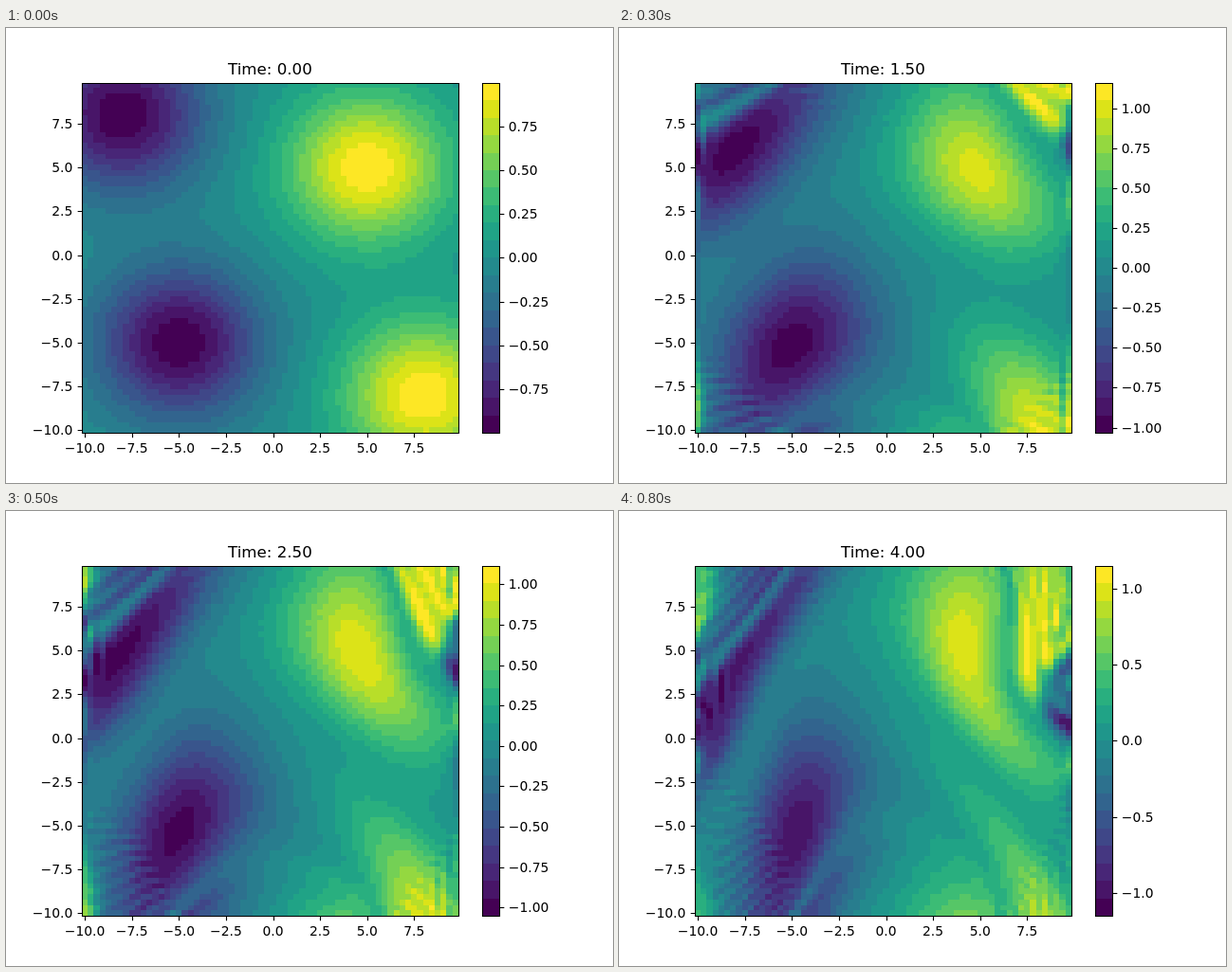
Write an HTML page with a canvas that moves like this. It is 640 px wide and 480 px high and loops after 0.9 s.

```html
<!DOCTYPE html>
<html lang="en">
<head>
<meta charset="utf-8">
<title>Vorticity</title>
<style>
  html, body { margin: 0; width: 100%; height: 100%; overflow: hidden; background: #fff; }
  .layer, .layer > * { position: absolute; left: 0; top: 0; width: 640px; height: 480px; }
  svg { font: 13.89px 'DejaVu Sans', sans-serif; }
  .title { font-size: 16.67px; }
  path { fill: none; stroke: #000; stroke-width: 1.11px; }
</style>
</head>
<body>
<script>
const N = 64, SIZE = 20, H = SIZE / N, VISCOSITY = 0.001;
const FRAMES = 9, FRAME_MS = 100, FRAME_DT = 0.5, SUBSTEPS = 8;
const COLORS = ('440154 481568 482677 453781 3f4788 39558c 32648e 2d718e 287d8e 238a8d ' +
  '1f968b 20a386 29af7f 3cbc75 56c667 74d055 94d840 b8de29 dce318 fde725').split(' ').map(c => '#' + c);
const PLOT = { left: 80, right: 476.8, top: 57.6, bottom: 427.2 };
const BAR = { left: 501.6, right: 520.08, top: 57.6, bottom: 427.2 };

// Periodic 2D vorticity equation: spectral Poisson solve, centred differences, RK4.
const field = fn => Float64Array.from({ length: N * N }, (_, n) => fn(n % N, Math.floor(n / N)));
const cas = field((i, k) => {
  const angle = 2 * Math.PI * ((i * k) % N) / N;
  return Math.cos(angle) + Math.sin(angle);
});
const inverseLaplacian = field((i, j) => {
  const kx = Math.min(i, N - i), ky = Math.min(j, N - j);
  return i + j ? -((SIZE / (2 * Math.PI)) ** 2) / (kx * kx + ky * ky) / (N * N) : 0;
});

function transformRows(a) {
  const out = new Float64Array(N * N);
  for (let i = 0; i < N; i++) {
    for (let j = 0; j < N; j++) {
      let sum = 0;
      for (let k = 0; k < N; k++) sum += a[j * N + k] * cas[i * N + k];
      out[i * N + j] = sum;
    }
  }
  return out;
}
const hartley = a => transformRows(transformRows(a));
const streamFunction = w => hartley(hartley(w).map((v, n) => v * inverseLaplacian[n]));

function rate(w) {
  const psi = streamFunction(w), out = new Float64Array(N * N);
  for (let j = 0; j < N; j++) {
    const row = j * N, up = ((j + 1) % N) * N, down = ((j + N - 1) % N) * N;
    for (let i = 0; i < N; i++) {
      const e = row + (i + 1) % N, o = row + (i + N - 1) % N, n = up + i, s = down + i;
      const swirl = (psi[e] - psi[o]) * (w[n] - w[s]) - (psi[n] - psi[s]) * (w[e] - w[o]);
      const spread = w[e] + w[o] + w[n] + w[s] - 4 * w[row + i];
      out[row + i] = (swirl / 4 + VISCOSITY * spread) / (H * H);
    }
  }
  return out;
}

function step(w, dt) {
  const shifted = (k, f) => w.map((v, n) => v + f * k[n]);
  const a = rate(w);
  const b = rate(shifted(a, dt / 2));
  const c = rate(shifted(b, dt / 2));
  const d = rate(shifted(c, dt));
  return w.map((v, n) => v + dt / 6 * (a[n] + 2 * b[n] + 2 * c[n] + d[n]));
}

const BLOBS = [[5, 5, 1], [8, -8, 1], [-5, -5, -1], [-8, 8, -1]];
const initialField = () => field((i, j) => {
  const x = i * H - SIZE / 2, y = j * H - SIZE / 2;
  return BLOBS.reduce((sum, [cx, cy, sign]) =>
    sum + sign * Math.exp(-((x - cx) ** 2 + (y - cy) ** 2) / 18), 0);
});

// Drawing
const lerp = (a, b, t) => a + (b - a) * t;
const snap = p => Math.round(p) + 0.5;
const label = (v, digits) => v.toFixed(digits).replace('-', '\u2212');
const text = (x, y, anchor, content, cls = '') =>
  `<text x="${x}" y="${y}" text-anchor="${anchor}" class="${cls}">${content}</text>`;
const box = b =>
  `<path d="M${snap(b.left)} ${snap(b.top)}H${snap(b.right)}V${snap(b.bottom)}H${snap(b.left)}Z"/>`;

function fillCell(ctx, color, x0, y0, x1, y1) {
  const [l, t, r, b] = [x0, y0, x1, y1].map(Math.round);
  ctx.fillStyle = color;
  ctx.fillRect(l, t, r - l, b - t);
}

function plotAxes() {
  let out = box(PLOT) + box(BAR);
  for (let v = -10; v < 9; v += 2.5) {
    const t = (v + SIZE / 2 + H / 2) / SIZE;
    const x = lerp(PLOT.left, PLOT.right, t), y = lerp(PLOT.bottom, PLOT.top, t);
    out += `<path d="M${snap(x)} 427.5v4.86M80.5 ${snap(y)}h-4.86"/>`;
    out += text(x, 448, 'middle', label(v, 1)) + text(70.3, Math.round(y + 5), 'end', label(v, 1));
  }
  return out;
}

function barAxis(min, max) {
  const gap = max - min > 2.25 ? 0.5 : 0.25;
  let out = '';
  for (let n = Math.ceil(min / gap); n * gap <= max; n++) {
    const y = lerp(BAR.bottom, BAR.top, (n * gap - min) / (max - min));
    out += `<path d="M520.5 ${snap(y)}h4.86"/>`;
    out += text(529.8, Math.round(y + 5), 'start', label(n * gap, gap === 0.5 ? 1 : 2));
  }
  return out;
}

function drawLayer(w, time) {
  const min = Math.min(...w), max = Math.max(...w), levels = COLORS.length;
  const layer = document.createElement('div');
  layer.className = 'layer';
  layer.innerHTML = `<canvas width="640" height="480"></canvas><svg viewBox="0 0 640 480">` +
    plotAxes() + barAxis(min, max) +
    text(278.4, 49, 'middle', `Time: ${time.toFixed(2)}`, 'title') + '</svg>';

  const ctx = layer.firstChild.getContext('2d');
  ctx.fillStyle = '#fff';
  ctx.fillRect(0, 0, 640, 480);
  const px = i => lerp(PLOT.left, PLOT.right, i / N);
  const py = j => lerp(PLOT.bottom, PLOT.top, j / N);
  w.forEach((v, n) => {
    const i = n % N, j = Math.floor(n / N);
    const level = Math.min(levels - 1, Math.floor((v - min) / (max - min) * levels));
    fillCell(ctx, COLORS[level], px(i), py(j + 1), px(i + 1), py(j));
  });
  const by = k => lerp(BAR.bottom, BAR.top, k / levels);
  COLORS.forEach((color, k) => fillCell(ctx, color, BAR.left, by(k + 1), BAR.right, by(k)));
  return layer;
}

const layers = [];
let vorticity = initialField();
for (let f = 0; f < FRAMES; f++) {
  layers.push(drawLayer(vorticity, f * FRAME_DT));
  if (f === FRAMES - 1) break;
  for (let s = 0; s < SUBSTEPS; s++) vorticity = step(vorticity, FRAME_DT / SUBSTEPS);
}
document.body.append(...layers);

// Opaque layers pile up one by one, then all but the first vanish at the loop point.
layers.slice(1).forEach((layer, n) => {
  const offset = (n + 1) / FRAMES;
  layer.animate([
    { opacity: 0, offset: 0 }, { opacity: 0, offset },
    { opacity: 1, offset }, { opacity: 1, offset: 1 }
  ], { duration: FRAMES * FRAME_MS, iterations: Infinity });
});
</script>
</body>
</html>
```
